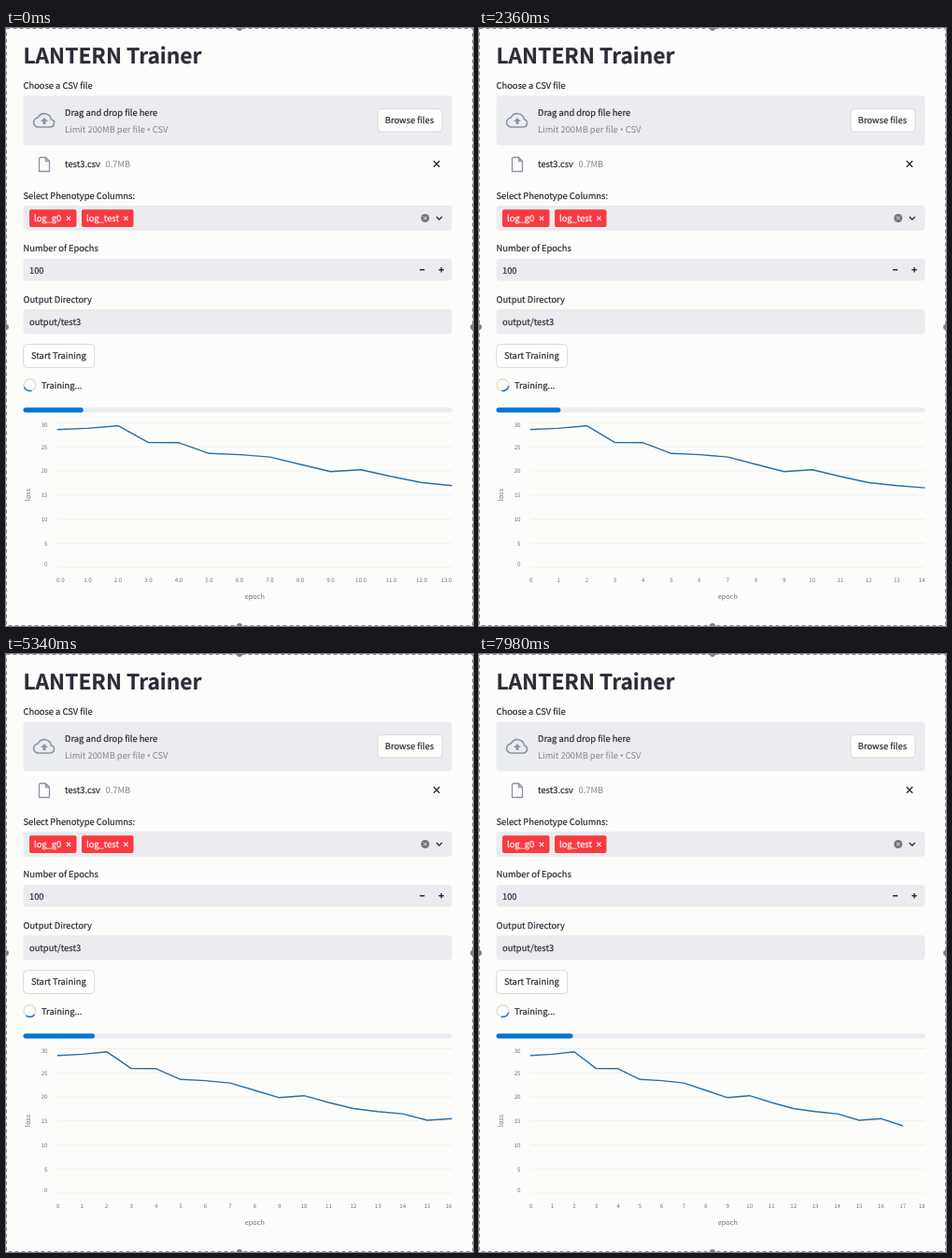
An HTML page for the animation above (8000 ms loop, 500 by 640 pixels).

```html
<!DOCTYPE html>
<html lang="en">
<head>
<meta charset="utf-8">
<title>Trainer</title>
<style>
  html, body { margin: 0; width: 100%; height: 100%; overflow: hidden; background: #fcfcfb; }
  svg { display: block; width: 500px; height: 640px; }
  text {
    font: 400 9.35px "Noto Sans CJK SC", "Noto Sans CJK JP", "Noto Sans CJK", "Open Sans", sans-serif;
    fill: #2b2c36; stroke: #2b2c36; stroke-width: .2;
    text-rendering: geometricPrecision; white-space: pre;
  }
  .title { font-size: 22.75px; font-weight: 700; }
  .muted { fill: #84858e; stroke: none; }
  .bullet { font-family: "Open Sans", sans-serif; }
  .chip rect { fill: #fa3a42; }
  .chip text { fill: #fff; stroke: #fff; }
  .chip path { stroke: #fff; stroke-width: 1.1; }
  .field { fill: #ebecef; }
  .button { fill: #fefefd; stroke: #d9dad6; }
  .line { fill: none; stroke: #2b2c36; stroke-width: 1.4; }
  .icon { fill: none; stroke: #8c93a8; stroke-width: 1.6; stroke-linejoin: round; }
  .chart text { font-size: 6.2px; fill: #74757e; stroke: none; }
  .chart .name { font-size: 7.3px; text-anchor: middle; }
  .grid { stroke: #f1f1ea; }
  .loss { fill: none; stroke: #2a6fa3; stroke-width: 1.4; stroke-linejoin: round; }
</style>
</head>
<body>
<svg viewBox="0 0 500 640">
  <rect width="500" height="640" fill="#fcfcfb"/>
  <rect x=".5" y=".5" width="499" height="639" fill="none" stroke="#8e8e8c" stroke-dasharray="4 3"/>
  <g fill="#80807e">
    <circle cx="250" cy="0" r="3"/><circle cx="250" cy="640" r="3"/>
    <circle cx="0" cy="320" r="3"/><circle cx="500" cy="320" r="3"/>
  </g>

  <text class="title" x="18.5" y="37.5">LANTERN Trainer</text>

  <text x="18.5" y="65.3">Choose a CSV file</text>
  <rect class="field" x="18.5" y="72.5" width="459" height="53" rx="4"/>
  <path class="icon" d="M35 106H48a4.2 4.2 0 0 0 .4-8.2A7.5 7.5 0 0 0 34.2 96a5 5 0 0 0 .8 10z"/>
  <path d="M41 96l4 4h-2.5v3h-3v-3H37z" fill="#8c93a8"/>
  <text x="63" y="94.4">Drag and drop file here</text>
  <text class="muted" x="63" y="112.4">Limit 200MB per file <tspan class="bullet">•</tspan> CSV</text>
  <rect class="button" x="398" y="86.5" width="69" height="24.5" rx="4"/>
  <text x="405.8" y="102">Browse files</text>

  <path class="icon" style="stroke-width:1.3" d="M36.5 138.5h6l4 4v11h-11v-14zM42.5 138.5v4h4"/>
  <text x="63" y="148.6">test3.csv</text>
  <text class="muted" x="106.5" y="148.6">0.7MB</text>
  <path class="line" d="M457.8 142.3l6.4 6.4m0-6.4l-6.4 6.4"/>

  <text x="18.5" y="183.4">Select Phenotype Columns:</text>
  <rect class="field" x="18.5" y="190" width="459" height="27" rx="4"/>
  <g class="chip">
    <rect x="25" y="194.2" width="50.5" height="18.7" rx="2"/>
    <text x="30" y="207.2">log_g0</text>
    <path d="M65 201.6l4.2 4.2m0-4.2l-4.2 4.2"/>
    <rect x="81" y="194.2" width="55.5" height="18.7" rx="2"/>
    <text x="86" y="207.2">log_test</text>
    <path d="M126.3 201.6l4.2 4.2m0-4.2l-4.2 4.2"/>
  </g>
  <circle cx="448.8" cy="203.5" r="4.5" fill="#73747c"/>
  <path d="M447 201.7l3.6 3.6m0-3.6l-3.6 3.6" stroke="#ebecef"/>
  <path class="line" d="M460.8 202l3 3 3-3"/>

  <text x="18.5" y="239.2">Number of Epochs</text>
  <rect class="field" x="18.5" y="247" width="459" height="23.5" rx="4"/>
  <text x="25" y="262.6">100</text>
  <path class="line" d="M443 258.7h5.2M463.4 258.7h5.4m-2.7-2.7v5.4"/>

  <text x="18.5" y="294.2">Output Directory</text>
  <rect class="field" x="18.5" y="301" width="459" height="26.5" rx="4"/>
  <text x="25" y="317.6">output/test3</text>

  <rect class="button" x="18.7" y="338.5" width="76" height="25" rx="4"/>
  <text x="27" y="354.4">Start Training</text>

  <g fill="none" stroke-width="1.6">
    <circle cx="25.5" cy="382" r="6.4" stroke="#e2e3d8"/>
    <path id="arc" d="M20.97 377.47A6.4 6.4 0 0 1 30.03 377.47" stroke="#2c7cc6"/>
  </g>
  <text x="38" y="386">Training...</text>

  <rect x="18.5" y="406.2" width="459" height="5.2" rx="2.6" fill="#e9edf1"/>
  <rect id="bar" x="18.5" y="406.2" height="5.2" rx="2.6" fill="#0576d6"/>

  <g class="chart">
    <g id="yAxis"></g>
    <g id="xAxis"></g>
    <polyline id="loss" class="loss"/>
    <text class="name" x="266.3" y="611">epoch</text>
    <text class="name" transform="translate(25.5 499.5) rotate(-90)">loss</text>
  </g>
</svg>
<script>
  const LOOP = 8000, LEFT = 55, RIGHT = 477.5, TOP = 422.5, BOTTOM = 577;
  const lossY = [429.7, 428.4, 425.7, 443.6, 443.8, 455.3, 456.6, 459.1, 467, 474.8,
                 472.7, 480, 486.5, 489.8, 492.1, 499, 497.3, 505];
  const epochSteps = [10, 53, 102, 152];   // ticks at which an epoch ends
  const EASE_TICKS = 30, FIRST_EPOCH = 13;
  const $ = id => document.getElementById(id);

  const label = (x, y, str, anchor) => `<text x="${x}" y="${y}" text-anchor="${anchor}">${str}</text>`;

  let yMarkup = '';
  for (let v = 0; v <= 30; v += 5) {
    const y = BOTTOM - (BOTTOM - TOP) * v / 30;
    const shift = v === 0 ? -0.6 : v === 30 ? 4.8 : 2.3;
    yMarkup += `<path class="grid" d="M${LEFT} ${y}H${RIGHT}"/>` + label(44.5, y + shift, v, 'end');
  }
  $('yAxis').innerHTML = yMarkup;

  let shownEpoch = -1;
  function drawChart(epoch) {
    if (epoch === shownEpoch) return;
    shownEpoch = epoch;
    const max = epoch > 14 ? Math.ceil(epoch / 2) * 2 : epoch;
    const px = e => LEFT + (RIGHT - LEFT) * e / max;
    let markup = '';
    for (let e = 0; e <= max; e++) {
      const anchor = e === 0 ? 'start' : e === max ? 'end' : 'middle';
      markup += label(px(e) - (e ? 0 : 1), 592.8, max === 13 ? e.toFixed(1) : e, anchor);
    }
    $('xAxis').innerHTML = markup;
    $('loss').setAttribute('points', lossY.slice(0, epoch + 1).map((y, e) => `${px(e)},${y}`).join(' '));
  }

  // Three ticks per 140 ms, lasting 20, 100 and 20 ms.
  function tickAt(ms) {
    const part = ms % 140;
    return 3 * Math.floor(ms / 140) + (part >= 120 ? 2 : part >= 20 ? 1 : 0);
  }

  function render(now) {
    const tick = tickAt(now % LOOP);
    let epoch = FIRST_EPOCH, progress = FIRST_EPOCH + 1;
    for (const step of epochSteps) {
      if (tick < step) break;
      epoch++;
      const p = Math.min(1, (tick - step) / EASE_TICKS);
      progress += 1 - (1 - p) ** 2;
    }
    drawChart(epoch);
    $('bar').setAttribute('width', 4.59 * progress);
    $('arc').setAttribute('transform', `rotate(${(205 + 6 * tick) % 360} 25.5 382)`);
  }

  const start = performance.now();
  function loop() {
    render(performance.now() - start);
    requestAnimationFrame(loop);
  }
  loop();
</script>
</body>
</html>
```
